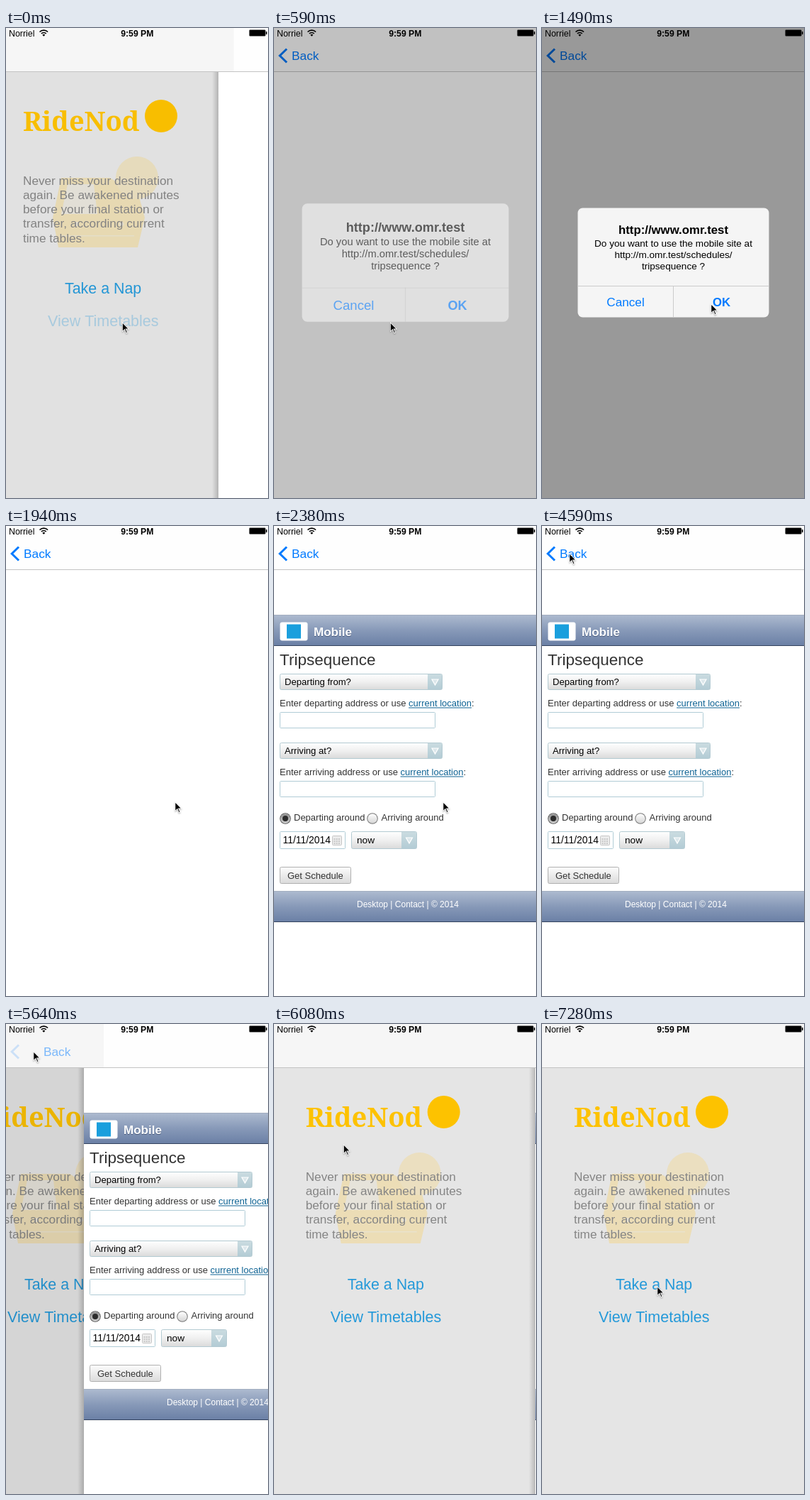
Recreate the animation shown at these times as an HTML page with a canvas. Size 370 by 662 pixels, loop 8000 ms.

```html
<!DOCTYPE html>
<html lang="en">
<head>
<meta charset="utf-8">
<title>Nap app demo</title>
<style>
html, body { margin: 0; width: 100%; height: 100%; overflow: hidden; background: #fff; }
canvas { display: block; width: 370px; height: 662px; }
</style>
</head>
<body>
<canvas id="stage"></canvas>
<script>
const W = 370, H = 662, NAV = 61;
const LOOP = 8000, STEP = 148.1;
const SANS = '"Liberation Sans", Arial, sans-serif';
const SLAB = '"Noto Serif", serif';
const TINT = '#007aff', LINK = '#2499d9', GOLD = '#fdc200';

const canvas = document.getElementById('stage');
const ctx = canvas.getContext('2d');
const dpr = window.devicePixelRatio || 1;
canvas.width = W * dpr;
canvas.height = H * dpr;

const clamp = v => Math.max(0, Math.min(1, v));
const spring = u => u <= 0 ? 0 : 1 - (1 + u) * Math.exp(-u);
const smooth = u => u * u * (3 - 2 * u);

// Pointer stops: [tick, x, y]
const POINTER = [
  [0, 164, 414], [7, 164, 414], [10, 238.5, 388], [19, 238.5, 388],
  [21, 146, 274], [22, 146, 274], [25, 82.5, 122], [26, 82.5, 122],
  [31, 38.5, 38], [38, 38.5, 38], [44, 157.5, 300], [45, 157.5, 300],
  [49, 162.5, 369], [60, 162.5, 369]
];

function text(str, x, y, size, color, opt = {}) {
  ctx.font = `${opt.weight || 400} ${size}px ${opt.family || SANS}`;
  ctx.textAlign = opt.align || 'left';
  ctx.fillStyle = color;
  ctx.fillText(str, x, y);
  return ctx.measureText(str).width;
}

function rect(x, y, w, h, fill) {
  ctx.fillStyle = fill;
  ctx.fillRect(x, y, w, h);
}

function disc(x, y, r, fill) {
  ctx.fillStyle = fill;
  ctx.beginPath();
  ctx.arc(x, y, r, 0, 7);
  ctx.fill();
}

function poly(points, fill) {
  ctx.beginPath();
  points.forEach(([x, y]) => ctx.lineTo(x, y));
  ctx.closePath();
  ctx.fillStyle = fill;
  ctx.fill();
}

function box(x, y, w, h, r, fill, stroke) {
  ctx.beginPath();
  ctx.roundRect(x + 0.5, y + 0.5, w - 1, h - 1, r);
  ctx.fillStyle = fill;
  ctx.fill();
  if (stroke) {
    ctx.strokeStyle = stroke;
    ctx.lineWidth = 1;
    ctx.stroke();
  }
}

function shade(y, h, ...colors) {
  const g = ctx.createLinearGradient(0, y, 0, y + h);
  colors.forEach((c, i) => g.addColorStop(i / (colors.length - 1), c));
  return g;
}

function shifted(dx, draw) {
  ctx.save();
  ctx.translate(dx, 0);
  draw();
  ctx.restore();
}

function drawTrain() {
  poly([[99, 211], [168, 211], [209, 238], [217, 267], [207, 309],
        [95, 309], [87, 267]], '#ecddb6');
  poly([[108, 220], [145, 220], [150, 262], [99, 262]], '#e6e3da');
  rect(96, 292, 106, 1.5, '#e9e2cd');
  disc(121, 276, 3, '#e8e3d5');
  disc(184, 276, 3, '#e8e3d5');
  disc(206, 211, 30, '#ebdfc0');
}

function drawHome(tick) {
  rect(0, NAV, W, H - NAV, '#e5e5e5');
  drawTrain();
  text('RideNod', 45, 144.5, 38, GOLD, { weight: 700, family: SLAB });
  disc(240, 124, 23, GOLD);
  ['Never miss your destination', 'again. Be awakened minutes',
   'before your final station or', 'transfer, according current', 'time tables.']
    .forEach((line, i) => text(line, 45, 220.5 + i * 20.25, 17.2, '#858585'));
  text('Take a Nap', 104, 374, 21.4, LINK);
  ctx.globalAlpha = clamp(0.3 + tick * 0.35);
  text('View Timetables', 80, 420, 21.5, LINK);
  ctx.globalAlpha = 1;
}

function drawBand(y) {
  rect(0, y, W, 44, shade(y, 44, '#aebbd0', '#8799b8', '#6a7fa5'));
  rect(0, y, W, 1, '#a3aec0');
  rect(0, y + 43, W, 1, '#34435f');
}

function drawSelect(x, y, w, h, label, size, pad) {
  const cell = h > 23 ? 22 : 21, cx = x + w - cell / 2, cy = y + h / 2;
  box(x, y, w, h, 2, shade(y, h, '#ffffff', '#f0f0f0', '#d9d9d9'), '#b3cad2');
  rect(x + w - cell, y + 1, cell - 1, h - 2, shade(y, h, '#cbdce1', '#b2cbd4'));
  poly([[cx - 4.5, cy - 3.5], [cx + 4.5, cy - 3.5], [cx, cy + 4.5]], '#dce7eb');
  ctx.strokeStyle = '#fff';
  ctx.lineWidth = 1.2;
  ctx.stroke();
  text(label, x + pad, cy + 4.2, size, '#000');
}

function drawField(x, y, w, h) {
  box(x, y, w, h, 1, '#fff', '#b0ccd6');
}

function drawPrompt(str, y) {
  const x = 8 + text(str, 8, y, 13, '#333');
  const w = text('current location', x, y, 13, '#0d6293');
  rect(x, y + 1.5, w, 1, '#0d6293');
  text(':', x + w, y, 13, '#333');
}

function drawRadio(x, y, on, label, labelX) {
  disc(x, y, 7.8, on ? '#4c4c4c' : '#777');
  disc(x, y, 6.8, shade(y - 7, 14, '#fff', '#d4d4d4'));
  if (on) {
    disc(x, y, 6.6, shade(y - 7, 14, '#8a8a8a', '#d0d0d0'));
    disc(x, y, 4, '#2c2c2c');
  }
  text(label, labelX, 415, 13, '#333');
}

function drawPlanner(images) {
  drawBand(125);
  if (images) {
    box(8, 135, 40, 27, 3, '#fff');
    rect(18, 138.5, 20, 20, '#1a9fdd');
  }
  text('Mobile', 56, 156, 17, '#46587a', { weight: 700 });
  text('Mobile', 56, 155, 17, '#fff', { weight: 700 });

  text('Tripsequence', 8, 196, 22.5, '#333');
  drawSelect(8, 208, 230, 23, 'Departing from?', 13.1, 7);
  drawPrompt('Enter departing address or use ', 254);
  drawField(8, 262, 220, 23);
  drawSelect(8, 305, 230, 23, 'Arriving at?', 13.1, 7);
  drawPrompt('Enter arriving address or use ', 351);
  drawField(8, 359, 220, 23);

  drawRadio(16, 412, true, 'Departing around', 28);
  drawRadio(139, 412, false, 'Arriving around', 151.5);

  drawField(8, 430, 93, 25);
  text('11/11/2014', 12.5, 447, 13.9, '#000');
  if (images) {
    box(82, 436, 14, 14, 1, '#ececec', '#c6c6c6');
    for (let i = 0; i < 9; i++) {
      rect(84.5 + i % 3 * 3.2, 440 + Math.floor(i / 3) * 3, 2, 2, '#c8c8c8');
    }
  }
  drawSelect(109, 430, 93, 25, 'now', 13.7, 8);

  box(8, 480, 101, 24, 2, shade(480, 24, '#fdfdfd', '#dadada'), '#b0b0b0');
  text('Get Schedule', 19, 497, 13, '#333');

  drawBand(514);
  text('Desktop | Contact | © 2014', 117, 537, 12, '#fff');
}

function drawNav(x, shown) {
  const edge = x + Math.min(28, x * 0.3, (W - x) * 0.31);
  rect(0, 0, W, NAV, '#fefefe');
  rect(0, 0, edge, NAV, '#f6f6f6');
  rect(0, NAV, W, 1, '#c3c3c3');

  ctx.globalAlpha = clamp((shown - 0.64) / 0.36);
  ctx.strokeStyle = TINT;
  ctx.lineWidth = 3;
  ctx.beginPath();
  ctx.moveTo(18, 29.5);
  ctx.lineTo(8.2, 39);
  ctx.lineTo(18, 48.5);
  ctx.stroke();
  ctx.globalAlpha = clamp((shown - 0.4) / 0.6);
  text('Back', 25 + 94 * (1 - shown), 45, 17.3, TINT);
  ctx.globalAlpha = 1;
}

function drawStatus() {
  text('Norriel', 4, 11.5, 12.4, '#000');
  ctx.strokeStyle = '#000';
  ctx.lineWidth = 1.7;
  [4.8, 8.2].forEach(r => {
    ctx.beginPath();
    ctx.arc(53.3, 11.3, r, -Math.PI * 0.75, -Math.PI * 0.25);
    ctx.stroke();
  });
  ctx.beginPath();
  ctx.moveTo(53.3, 11.8);
  ctx.arc(53.3, 11.8, 2.8, -Math.PI * 0.75, -Math.PI * 0.25);
  ctx.fillStyle = '#000';
  ctx.fill();
  text('9:59 PM', 185.3, 11.5, 12.2, '#000', { weight: 700, align: 'center' });
  box(343, 2, 24, 10, 1.5, 'rgba(0,0,0,0)', 'rgba(0,0,0,.45)');
  rect(344, 3, 22, 8, '#000');
  rect(367, 5, 1.5, 4, '#000');
}

function drawAlert(alpha, scale) {
  const mid = { align: 'center' }, bold = { align: 'center', weight: 700 };
  rect(0, 0, W, H, `rgba(0,0,0,${0.4 * alpha})`);
  ctx.save();
  ctx.globalAlpha = alpha;
  ctx.translate(185.5, 330.5);
  ctx.scale(scale, scale);
  ctx.translate(-185.5, -330.5);
  ctx.beginPath();
  ctx.roundRect(50.5, 253.5, 270, 154, 7);
  ctx.fillStyle = '#f5f5f5';
  ctx.fill();
  rect(50.5, 363, 270, 1, '#cbcbcb');
  rect(185, 363, 1, 44.5, '#cbcbcb');
  text('http://www.omr.test', 185.5, 290, 16.8, '#000', bold);
  ['Do you want to use the mobile site at', 'http://m.omr.test/schedules/', 'tripsequence ?']
    .forEach((line, i) => text(line, 185.5, 307.5 + i * 16, 13.6, '#000', mid));
  text('Cancel', 118, 392, 17.2, TINT, mid);
  text('OK', 253.5, 392, 16.8, TINT, bold);
  ctx.restore();
}

function drawPointer(tick) {
  const i = POINTER.findIndex(p => p[0] > tick);
  const [t0, x0, y0] = POINTER[i - 1], [t1, x1, y1] = POINTER[i];
  const u = smooth((tick - t0) / (t1 - t0));
  ctx.save();
  ctx.translate(x0 + (x1 - x0) * u, y0 + (y1 - y0) * u);
  ctx.shadowColor = 'rgba(0,0,0,.35)';
  ctx.shadowBlur = 2 * dpr;
  ctx.shadowOffsetY = dpr;
  poly([[0, 0], [0, 14.3], [3.3, 11.3], [5.5, 16.4], [8, 15.4], [5.8, 10.4], [10.2, 10.4]], '#fff');
  ctx.shadowColor = 'transparent';
  poly([[0.8, 1.9], [0.8, 12.4], [3.6, 9.8], [6, 15.2], [6.9, 14.8], [4.5, 9.5], [8.2, 9.5]], '#000');
  ctx.restore();
}

function draw(tick) {
  // How far the web page has slid in: 0 is home, 1 is the page
  const shown = tick < 38
    ? spring(0.795 + 2.22 * tick)
    : 1 - spring(1.09 + 2.22 * (tick - 38));
  const x = Math.round(W * (1 - shown));

  ctx.setTransform(dpr, 0, 0, dpr, 0, 0);
  rect(0, 0, W, H, '#fff');
  if (x > 0) {
    shifted(-0.3 * (W - x), () => drawHome(tick));
    rect(0, NAV, x, H - NAV, `rgba(0,0,0,${0.1 * shown})`);
  }
  if (x > 0 && x < W) {
    const g = ctx.createLinearGradient(x - 9, 0, x, 0);
    g.addColorStop(0, 'rgba(0,0,0,0)');
    g.addColorStop(1, 'rgba(0,0,0,.2)');
    rect(x - 9, NAV, 9, H - NAV, g);
  }
  if (x < W) {
    shifted(x, () => {
      rect(0, NAV, W, H - NAV, '#fff');
      if (tick >= 15) drawPlanner(tick >= 16);
    });
  }
  drawNav(x, shown);
  drawStatus();

  if (tick >= 4 && tick < 13) {
    const p = spring(2 + 3 * (tick - 4));
    drawAlert(tick < 12 ? p : 0.48, 1.2 - 0.2 * p);
  }
  drawPointer(tick);
}

function frame() {
  const t = performance.now() % LOOP;
  draw(Math.min(53, Math.floor((t + 4) / STEP)));
  requestAnimationFrame(frame);
}
frame();
</script>
</body>
</html>
```
